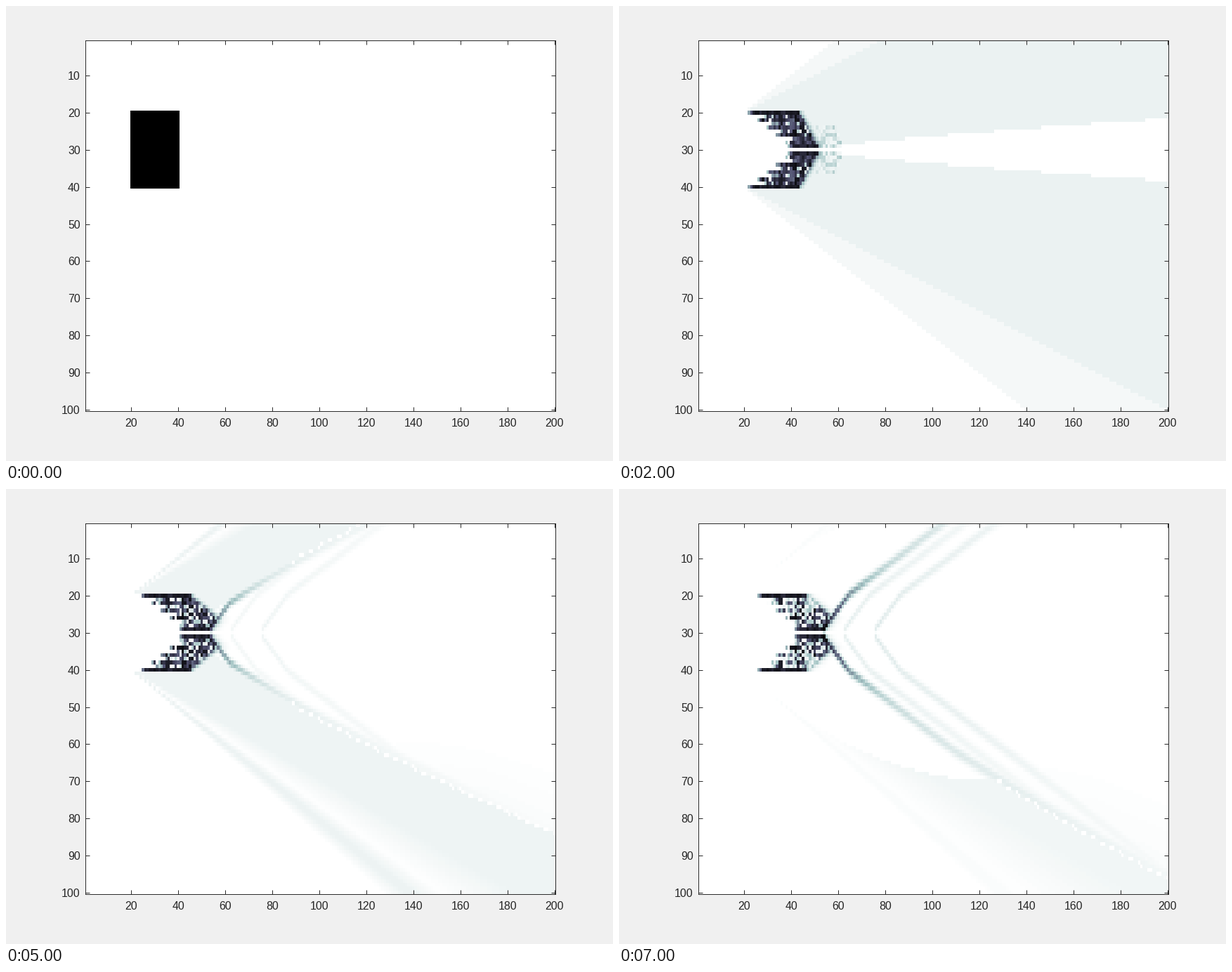
These frames come from a looping animation (864 by 648 pixels, 8000 ms). A matplotlib script:

```python
import numpy as np
import matplotlib.pyplot as plt
from matplotlib.animation import FuncAnimation

W, H, DPI = 864, 648, 100
STEPS, STEP_MS = 8, 1000
INK = "0.15"
plt.rcParams["font.family"] = "Liberation Sans"

# Column numbers and distance from the mirror axis at row 30
C, R = np.meshgrid(np.arange(1, 201), np.arange(1, 101))
A = np.abs(R - 30)
RISE = 10 - A
SLOPE = np.where(A > 10, (C - 20) / np.maximum(A - 10, 1), np.where(C > 20, 9, 0))

rng = np.random.RandomState(4)
GRAIN, GAPS, PALE = (rng.rand(100, 200)[A, C - 1] for _ in range(3))


def ramp(x, start, end):
    return np.clip((x - start) / (end - start), 0, 1)


def first_wings():
    return .031 * (SLOPE >= 2) + .027 * (SLOPE >= 3)


def late_wings(t):
    """Thin outer band, white gap, then the wide main band."""
    outer = 1.94 - .03 * t
    gap = 1.7 + .7 ** (t - 3)
    strength = .05 * ramp(gap - outer, 0, .35)
    band = strength * ramp(SLOPE, outer, outer + .15) * ramp(gap - SLOPE, 0, .2)
    main = (.066 - .004 * t) * ramp(SLOPE, gap, gap + .25 + .15 * (t - 3))
    return .004 * (SLOPE > outer) + np.maximum(band, main)


def wing_limit(t):
    """Distance from the axis where the wings begin behind the cleared wedge."""
    opening = .15 * (t - 1) if t < 4 else .85 + .11 * (t - 4)
    return opening * np.maximum(C - 46, 0) ** .8


def jet_path(c):
    return np.minimum(.85 * (c - 52.5), 10.5 + .48 * (c - 65))


def add_jets(field, t, limit):
    """Parallel streaks that strengthen with time and fade downstream."""
    for shift, gain in ((0, 1), (9, .4), (22, .5)):
        along = C - shift - 54
        far = np.maximum(along, 0)
        tail = min(.95, .35 + .25 * (t - 4)) * np.exp(-far / 9) * (shift == 0)
        trail = .045 * (t - 3) * gain * np.exp(-far / 90)
        centre = jet_path(C - shift)
        if shift == 0:
            centre = np.minimum(centre, limit - .8)
        width = .9 + np.minimum(far, 100) * .01
        glow = (tail + trail) * np.exp(-((A - centre) / width) ** 2)
        field = np.where(along >= 0, np.maximum(field, glow), field)
    haze = .014 * ramp(A, .6 * limit, .95 * limit + 1) * ramp(C, 110, 170)
    return np.where(A < limit, np.maximum(field, haze), field)


def first_wave():
    """Striped block with a pointed front and plain wings."""
    field = first_wings()
    block = A <= 10
    for reach, value in ((3.1, .1), (2.1, .22), (1.05, .43), (.45, .84)):
        field[block & (C > 39) & (C <= 41 + RISE * reach)] = value
    for end, value in ((200, .025), (61, .16), (46, .45)):
        field[(A == 0) & (C > 39) & (C <= end)] = value

    start = np.minimum(22 + 2 * RISE, 39)
    inside = block & (C >= 20) & (C < start)
    field[inside] = np.where(A >= 6, .225, .2)[inside]
    stripes = block & (C >= start) & (C <= 40) & (A > 0)
    field[stripes] = np.where(A % 2 == 0, .83, .61)[stripes]
    return field


def add_body(field, t):
    """Dark ragged head: a staircase on the left, a fish tail on the right."""
    odd = (A % 2 == 1) & (A > 1)
    left = np.minimum(20 + .85 * t + 2 * RISE, 38 + .5 * t) + 4 * odd
    left = np.minimum(left, 42)
    right = np.minimum(42 + .6 * t + RISE * min(1.9, .45 * t), 52.5 + A / .85)
    rows = (A <= 10) & (A > 0)
    field[(A <= 10) & (C < left)] = 0

    rim = (A == 10) | (A == 1)
    holes = (.02 + .08 * (t - 1) + .25 * (odd & (C < 41))) * ~rim
    dark = np.where(rim, .8 + .12 * GRAIN, .55 + .4 * GRAIN)
    dark = np.where(GAPS < holes, .35 * PALE ** 2, dark)
    dark = dark * ramp(C, left - 1, left + 2)
    solid = rows & (C >= left) & (C <= right)
    field[solid] = dark[solid]

    after = rows & (C > right)
    edge = .55 * np.exp(-np.maximum(C - right, 0) / 1.2)
    field[after] = np.maximum(field, edge)[after]
    return field


def density(t):
    if t == 0:
        return ((A <= 10) & (C >= 20) & (C <= 40)).astype(float)
    if t == 1:
        return first_wave()

    limit = wing_limit(t)
    cut = limit
    if t == 7:
        hollow = 40 - .0026 * (126 - C) ** 2
        cut = np.where(C < 126, np.maximum(limit, hollow), limit)
    wings = first_wings() if t == 2 else late_wings(t)
    field = np.where(A > cut, wings, 0)

    if t < 4:
        spray = (A > 0) & (A <= 6) & (C > 50) & (C <= 62 - A * .5)
        field[spray] = (.04 + .2 * PALE ** 2)[spray]
    else:
        field = add_jets(field, t, limit)
        dots = (np.abs(A - limit) <= .5) & (C >= 70 + 19 * (t - 4))
        field[dots & (C // 2 % 2 == 0)] = 0
    return add_body(field, t)


fields = [density(t) for t in range(STEPS)]

fig = plt.figure(figsize=(W / DPI, H / DPI), dpi=DPI, facecolor="#f0f0f0")
ax = fig.add_axes([113.2 / W, 1 - 577.2 / H, 669 / W, 528 / H])
image = ax.imshow(fields[0], cmap="bone_r", vmin=0, vmax=1, aspect="auto",
                  interpolation="nearest", extent=(.5, 200.5, 100.5, .5))
ax.set_xticks(range(20, 201, 20))
ax.set_yticks(range(10, 101, 10))
ax.tick_params(direction="in", top=True, right=True, length=4.5, width=.7,
               color=INK, labelcolor=INK, labelsize=11.4)
ax.tick_params(axis="x", pad=6.9)
ax.tick_params(axis="y", pad=5.3)
for spine in ax.spines.values():
    spine.set(linewidth=.7, color=INK)


def draw(t):
    image.set_data(fields[t])
    return [image]


anim = FuncAnimation(fig, draw, frames=STEPS, interval=STEP_MS, repeat=True)
plt.show()
```
